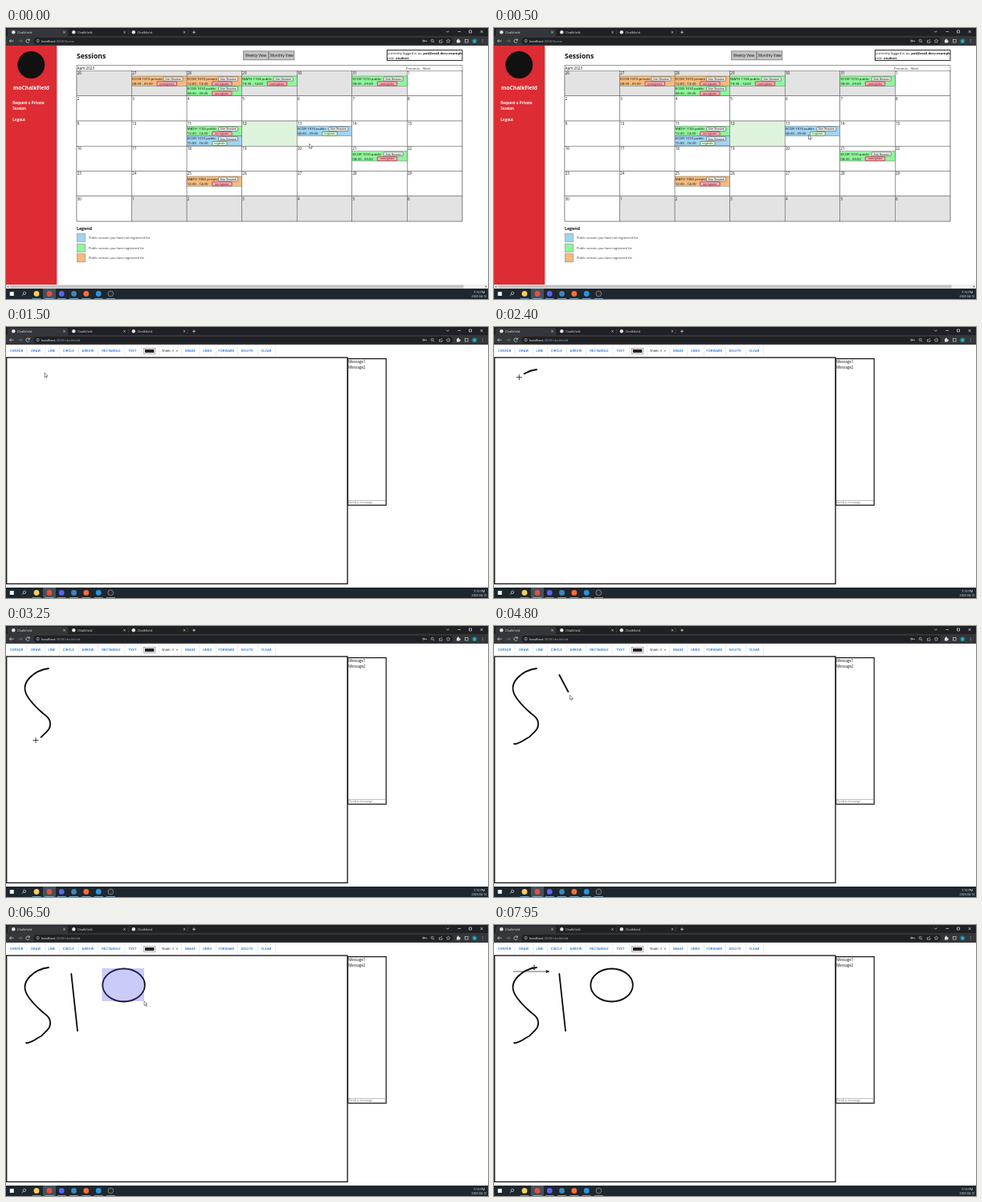
An HTML page that plays this animation: 600x338 px, repeating every 8 s.

```html
<!DOCTYPE html>
<html lang="en">
<head>
<meta charset="utf-8">
<title>Sessions</title>
<style>
  html, body { margin: 0; width: 100%; height: 100%; overflow: hidden; background: #fff; }
  svg { display: block; width: 100%; height: 100%; }
  text { font-family: "Open Sans", "Noto Sans", sans-serif; white-space: pre; }
  .arial { font-family: "Liberation Sans", Arial, sans-serif; }
  .tool { font-family: Roboto, sans-serif; font-weight: 500; letter-spacing: .13px; }
  .bold { font-weight: 700; }
</style>
</head>
<body>
<svg id="stage" viewBox="0 0 600 338"></svg>
<script>
const LOOP = 8000, JOIN_AT = 1150, LAG = 65;
const BLUE = '#9fd4f3', GREEN = '#8ff59b', ORANGE = '#f4ba7d';

const rect = (x, y, w, h, fill, more = '') =>
  `<rect x="${x}" y="${y}" width="${w}" height="${h}" fill="${fill}" ${more}/>`;
const circle = (x, y, r, fill, more = '') =>
  `<circle cx="${x}" cy="${y}" r="${r}" fill="${fill}" ${more}/>`;
const path = (d, stroke, width = .7, more = 'fill="none"') =>
  `<path d="${d}" stroke="${stroke}" stroke-width="${width}" ${more}/>`;
const text = (x, y, size, str, fill = '#111', more = '') =>
  `<text x="${x}" y="${y}" font-size="${size}" fill="${fill}" ${more}>${str}</text>`;
const outline = (color, width) => `stroke="${color}" stroke-width="${width}"`;
const BOLD = 'class="bold"', ARIAL = 'class="arial"', MIDDLE = 'text-anchor="middle"';

function browser() {
  const light = '#dfe1e5';
  let s = rect(0, 0, 600, 11, '#202124') + rect(0, 10, 600, 12, '#35363a') +
    rect(2, 1, 75, 12, '#35363a', 'rx="2"');
  [2, 77, 151.5].forEach((x, i) => {
    s += circle(x + 7.3, 5.3, 2.2, light) +
      text(x + 12, 7, 4, 'Chalkfield', light) +
      path(`M${x + 69.2} 4l2.6 2.6m0-2.6l-2.6 2.6`, light, .6);
    if (i) s += rect(x + 75, 2.5, .4, 5.5, '#666');
  });
  s += path('M232 5.3h4m-2-2v4M548 3.6l1.7 1.7 1.7-1.7M562.5 4.5h3.4M576.5 3h3v3h-3zM590.5 3l3.2 3.2m0-3.2l-3.2 3.2', light);
  s += path('M9.5 16.2h-5m2-2l-2 2 2 2', light) +
    path('M15 16.2h5m-2-2l2 2-2 2', '#7b7c80') +
    path('M29 15a2.2 2.2 0 1 0 .1 2.2M29.3 13.5v1.8h-1.8', light) +
    rect(34, 11.9, 522.5, 8.6, '#202124', 'rx="4.3"') +
    path('M39.6 15.6v2M39.6 14.2v.7', light, .5) + circle(39.6, 16.1, 1.8, 'none', outline(light, .4)) +
    `<text x="44" y="18" font-size="4.2" fill="#fff">localhost<tspan id="url" fill="#9aa0a6"></tspan></text>`;
  s += circle(519.8, 16.2, 1, 'none', outline(light, .7)) + path('M521 16.2h2.4v1', light) +
    circle(530.6, 15.8, 1.5, 'none', outline(light, .6)) + path('M531.8 17l1.4 1.4', light) +
    path('M539.4 15v3.2h3.6v-2M540.5 16.5q.5-2 2.5-2', light, .6) +
    path('M550.5 13.8l.7 1.5 1.7.2-1.2 1.1.3 1.7-1.5-.8-1.5.8.3-1.7-1.2-1.1 1.7-.2z', light, .5) +
    rect(561, 14.7, 3.8, 3.8, light, 'rx=".6"') + circle(562.9, 14.4, .9, light) + circle(565, 16.6, .9, light) +
    rect(571.5, 14.4, 3.6, 3.6, 'none', outline(light, .6)) +
    circle(583.2, 16.2, 3, '#12818f') + text(583.2, 17.5, 3.6, 'D', '#fff', MIDDLE);
  for (const y of [14.5, 16.2, 17.9]) s += circle(593.2, y, .45, light);
  return s;
}

function taskbar() {
  let s = rect(0, 325, 600, 13, '#1d272d') + rect(46, 325, 16, 13, '#45505a') +
    rect(4.8, 329, 5, 5, '#f2f5f7') +
    circle(23, 330.8, 1.7, 'none', outline('#eee', .6)) + path('M21.8 332l-1.9 1.9', '#eee');
  [[38, '#f6cf5a'], [54, '#e2523f'], [69.2, '#5865f2'], [84.5, '#3f86bd'],
   [99.8, '#ff6c37'], [115.2, '#2795df'], [130.3, '#2b2b30']].forEach(([x, color], i) => {
    s += circle(x, 331.4, 3.4, color, i == 6 ? outline('#ccc', .5) : '') +
      rect(x - 5.5, 337.2, 11, .8, '#80b8e0');
  });
  return s + text(589, 331, 3.8, '7:19 PM', '#fff', MIDDLE) + text(589, 336.3, 3.6, '2023-04-12', '#fff', MIDDLE);
}

const COL = 68.55, ROW = 31.25, LEFT = 88, TOP = 53.5;

function session(col, row, slot, title, hours, color) {
  const x = LEFT + col * COL, y = TOP + 7 + row * ROW + slot * 12.1;
  const open = color == BLUE;
  const edge = open ? '#3f8f4a' : '#a83246';
  return rect(x, y - .5, COL, 12.2, color, outline('#555', .4)) +
    text(x + .7, y + 4.3, 4.35, title) + text(x + .7, y + 10.3, 4.3, hours) +
    rect(x + 39.5, y + .6, 24, 5, '#f4f4f4', outline('#555', .6) + ' rx=".6"') +
    text(x + 51.5, y + 4.4, 3.6, 'Join Session', '#111', `${ARIAL} ${MIDDLE}`) +
    rect(x + 31.5, y + 6.4, open ? 18.5 : 24.5, 5, open ? '#e4f8e2' : '#f3b3b8', outline(edge, .8) + ' rx=".6"') +
    text(x + (open ? 40.7 : 43.7), y + 10.1, 4, open ? 'register' : 'unregister', open ? '#17691f' : '#8c1024', `${ARIAL} ${MIDDLE}`);
}

function calendar() {
  let s = rect(LEFT, 46.3, 480, 194.7, '#fff', outline('#555', .6)) +
    text(88.5, 51.8, 4.6, 'April 2023') +
    text(498, 51.5, 4.3, 'Previous', '#333') + text(519, 51.5, 4.3, 'Next', '#333');
  for (let i = 0; i < 42; i++) {
    const x = LEFT + i % 7 * COL, y = TOP + Math.floor(i / 7) * ROW;
    const otherMonth = i < 6 || i > 35;
    const day = i < 6 ? i + 26 : (i - 6) % 30 + 1;
    s += rect(x, y, COL, ROW, otherMonth ? '#e3e3e3' : i == 17 ? '#def3dc' : '#fff', outline('#555', .5)) +
      text(x + .7, y + 4.8, 4.5, day);
  }
  const ecor = 'ECOR 1010 public', ecorPrivate = 'ECOR 1010 private', math = 'MATH 1104 public';
  const early = '08:30 - 09:00', noon = '12:30 - 14:00';
  return s + [
    [1, 0, 0, ecorPrivate, early, ORANGE],
    [2, 0, 0, ecorPrivate, '12:00 - 13:00', ORANGE],
    [2, 0, 1, ecor, early, GREEN],
    [3, 0, 0, math, '10:30 - 14:00', GREEN],
    [5, 0, 0, ecor, early, GREEN],
    [2, 2, 0, math, noon, GREEN],
    [2, 2, 1, ecor, '15:00 - 16:00', BLUE],
    [4, 2, 0, ecor, early, BLUE],
    [5, 3, 0, ecor, early, GREEN],
    [2, 4, 0, 'MATH 1004 private', noon, ORANGE],
  ].map(args => session(...args)).join('');
}

function homePage() {
  let s = rect(0, 22, 600, 303, '#fff') + rect(0, 22, 63.3, 298, '#dd2c33') +
    circle(31.3, 46, 17, '#111') +
    text(31.5, 77, 6.6, 'moChalkField', '#fff', `${BOLD} ${MIDDLE}`) +
    [['Request a Private', 95.4], ['Session', 101.8], ['Logout', 116]]
      .map(([label, y]) => text(8.3, y, 4.5, label, '#fff', BOLD)).join('') +
    text(88, 38, 8.6, 'Sessions', '#111', BOLD);
  [[295.5, 'Weekly View'], [327.8, 'Monthly View']].forEach(([x, label]) => {
    s += rect(x, 28.8, 31, 11, '#c4c4c4', outline('#777', .8)) +
      text(x + 15.5, 36, 4.6, label, '#111', MIDDLE);
  });
  s += rect(474.3, 27.6, 93.7, 12.8, '#fff', outline('#111', .9)) +
    `<svg x="475" y="27" width="92.8" height="14">` +
    text(.3, 6.2, 4.2, 'currently logged in as: <tspan class="bold">pat@mail.dorv.example</tspan>') +
    text(.3, 12, 4.2, 'role: <tspan class="bold">student</tspan>') + '</svg>';
  s += calendar() + text(88, 251.6, 5.3, 'Legend', '#111', BOLD);
  [[BLUE, 'not registered for'], [GREEN, 'registered for'], [ORANGE, 'registered for']].forEach(([color, label], i) => {
    const y = 256.7 + i * 12.5;
    s += rect(88.4, y, 10.2, 10.2, color, outline('#777', .5)) +
      text(103, y + 6.4, 3.95, 'Public session you have ' + label, '#333');
  });
  return s + rect(0, 320, 600, 5, '#f1f1f1') + rect(5.5, 320.6, 564, 3.8, '#c3c3c3') +
    path('M3.2 321.2v2.8l-1.8-1.4zM596.8 321.2v2.8l1.8-1.4z', 'none', 0, 'fill="#555"') +
    `<g id="status">${rect(0, 319.7, 47.5, 5.5, '#d5d6d8')}${text(1, 324, 3.6, 'localhost:3000/chalkfield', '#444')}</g>`;
}

function boardPage() {
  let s = rect(0, 22, 600, 303, '#fff');
  [['CURSOR', 13.2, 25.7], ['DRAW', 37.2, 48], ['LINE', 57, 66.3], ['CIRCLE', 77.8, 90], ['ARROW', 102, 114.2],
   ['RECTANGLE', 131, 147.7], ['TEXT', 157.5, 168], ['', 0, 190], ['', 0, 218.3], ['IMAGE', 229.5, 240.5],
   ['UNDO', 250.8, 261.2], ['FORWARD', 274.5, 288.2], ['DELETE', 300.2, 313], ['CLEAR', 324, 335]].forEach(([label, x, end]) => {
    s += text(x, 31.4, 4.05, label, '#1f72d0', `class="tool" ${MIDDLE}`) + rect(end, 22.5, .4, 15, '#c3daf2');
  });
  return s + rect(171.3, 26.5, 14.7, 7, '#efefef', outline('#777', .5)) + rect(173, 28, 11.3, 4, '#2b2024') +
    text(194, 31.4, 4.1, 'Width: 3', '#333', 'style="font-family:Roboto,sans-serif"') +
    path('M211.4 29.2h3l-1.5 1.6z', 'none', 0, 'fill="#666"') +
    rect(.7, 38.1, 424.4, 282.2, '#fff', outline('#111', 1.3)) +
    rect(425.5, 39.6, 47.7, 182.6, '#fff', outline('#111', 1.2)) +
    text(426.3, 45.4, 4.5, 'Message1') + text(426.3, 51.6, 4.5, 'Message2') +
    rect(426.2, 216.2, 46.2, 5.2, '#fff', outline('#777', .5)) +
    text(426.9, 220.1, 3.9, 'Send a message', '#777', ARIAL) +
    `<g fill="none" stroke="#080808" stroke-width="1.8" stroke-linecap="round" stroke-linejoin="round">
      <path id="scribble" d="M53 53C45 54 36 58 30 64C25 69 22 76 24.5 83C27 91 36 100 46 109C52 113 55 117 55 121C56 129 50 132 44 138.5C40 140 33 146 30 146Q28 147.3 25 147"/>
      <line id="line" x1="81.3" y1="61"/>
      <ellipse id="oval"/>
    </g>
    <rect id="marquee" x="119.5" y="54" fill="#5555ee" fill-opacity=".3"/>
    <path id="arrow" d="M24 58H67M65 56.6L69 58L65 59.4Z" fill="#222" stroke="#222" stroke-width=".7"/>`;
}

const pointers = {
  arrow: path('M0 0V5.6L1.3 4.4L2.2 6.4L3.1 6L2.2 4.1H4Z', '#222', .5, 'fill="#fff"'),
  hand: path('M-.6 0Q0-.8.6 0V2L3 2.7Q3.6 3 3.3 4L2.7 6H-.2L-2 3.6Q-1.8 2.8-.6 3.8Z', '#222', .5, 'fill="#fff"'),
  cross: path('M-3.6 0H3.6M0-3.6V3.6', '#111', .8),
  move: path('M-3 0H3M0-3V3M-2-1L-3 0L-2 1M2-1L3 0L2 1M-1-2L0-3L1-2M-1 2L0 3L1 2', '#222', .7),
};

const stage = document.getElementById('stage');
stage.innerHTML = `<g id="home">${homePage()}</g><g id="board">${boardPage()}</g>` + browser() + taskbar() +
  '<g id="pointer">' + Object.entries(pointers).map(([id, shape]) => `<g id="p-${id}">${shape}</g>`).join('') + '</g>';

const el = id => document.getElementById(id);
const show = (id, on) => el(id).style.display = on ? '' : 'none';
const set = (id, attrs) => { for (const key in attrs) el(id).setAttribute(key, attrs[key]); };
const clamp = v => Math.min(1, Math.max(0, v));

// Pointer stops: time, x, y, and 1 where the move to it is a steady drag.
const STOPS = [
  [0, 377.5, 144.5], [150, 377.5, 144.5], [800, 402.5, 124.5], [1100, 402.5, 124.5], [1480, 48, 57],
  [1520, 48, 57], [1800, 37, 30], [1930, 37, 30], [2200, 53, 53], [3360, 25, 147], [3480, 25, 147],
  [3950, 57, 30], [4080, 57, 30], [4400, 81.3, 61], [4800, 94.5, 86, 1], [5100, 89, 132, 1], [5200, 89, 132],
  [5600, 78, 30], [5720, 78, 30], [6000, 119.5, 54], [6400, 172, 95, 1], [6600, 172, 95],
  [7250, 102, 30], [7430, 102, 30], [7800, 50, 53], [LOOP, 50, 53],
];
const scribble = el('scribble'), scribbleLength = scribble.getTotalLength();
const scribblePart = t => clamp((t - 2200) / 1160);

function pointerAt(t) {
  if (t > 2200 && t < 3360) {
    const p = scribble.getPointAtLength(scribbleLength * scribblePart(t));
    return [p.x, p.y];
  }
  const i = STOPS.findIndex(stop => stop[0] > t);
  const [t0, x0, y0] = STOPS[i - 1], [t1, x1, y1, steady] = STOPS[i];
  const u = (t - t0) / (t1 - t0), k = steady ? u : u * u * (3 - 2 * u);
  return [x0 + (x1 - x0) * k, y0 + (y1 - y0) * k];
}

function pointerKind(t, y) {
  if (t < JOIN_AT) return t > 720 ? 'hand' : 'arrow';
  if (t > 1600 && y < 37) return 'hand';
  if (t > 1930 && t < 3950) return 'cross';
  return t > 7700 ? 'move' : 'arrow';
}

function draw(t) {
  const onBoard = t >= JOIN_AT;
  show('home', !onBoard);
  show('board', onBoard);
  show('status', t > 780);
  el('url').textContent = ':3000/' + (onBoard ? 'chalkfield' : 'home');

  const part = scribblePart(t - LAG);
  show('scribble', part > 0);
  set('scribble', { 'stroke-dasharray': `${scribbleLength * part} 999` });

  const [lineX, lineY] = pointerAt(Math.min(5100, Math.max(4400, t - LAG)));
  show('line', t > 4400 + LAG);
  set('line', { x2: lineX, y2: lineY });

  const [ovalX, ovalY] = pointerAt(Math.min(6400, Math.max(6000, t - LAG)));
  const w = ovalX - 119.5, h = ovalY - 54;
  show('oval', w > 0);
  set('oval', { cx: 120.3 + w / 2, cy: 54.5 + h / 2, rx: w / 2, ry: h / 2 });
  show('marquee', w > 0 && t < 6600);
  set('marquee', { width: w, height: h });
  show('arrow', t > 7400);

  const [x, y] = pointerAt(t), kind = pointerKind(t, y);
  set('pointer', { transform: `translate(${x} ${y})` });
  for (const id in pointers) show('p-' + id, id == kind);
}

const start = performance.now();
function frame() {
  draw((performance.now() - start) % LOOP);
  requestAnimationFrame(frame);
}
frame();
</script>
</body>
</html>
```
